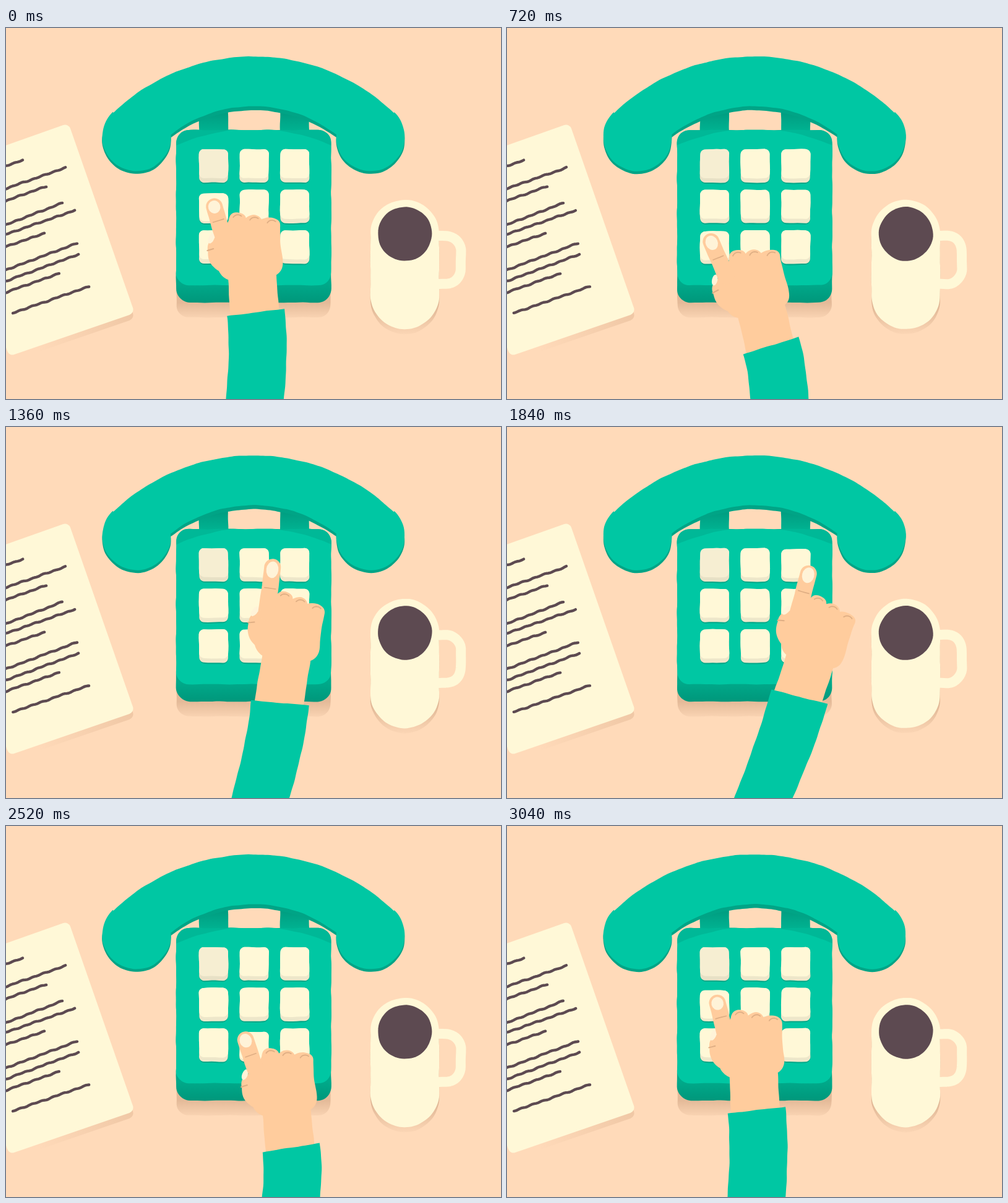
An HTML page with a canvas for the animation above (3.08 s loop, 800 by 600 pixels).

```html
<!DOCTYPE html>
<html lang="en">
<head>
<meta charset="utf-8">
<title>Dialling</title>
<style>
html, body { margin: 0; width: 100%; height: 100%; overflow: hidden; background: #ffdab9; }
canvas { display: block; }
</style>
</head>
<body>
<canvas id="stage" width="800" height="600"></canvas>
<script>
const ctx = document.getElementById('stage').getContext('2d');
const LOOP = 3080, STEP = 40, TAU = Math.PI * 2;
const GREEN = '#00c7a3', CREAM = '#fff8d7', SKIN = '#ffcc9d', CREASE = '#dfae84', BROWN = '#5d4a51';
let phase = 0;

// A path sampled into short steps, so its edge can wobble like a hand-cut shape.
class Shape {
  constructor(amp = 0.3) { this.pts = []; this.amp = amp; }
  to(x, y) {
    const last = this.pts[this.pts.length - 1];
    if (!last) { this.pts.push([x, y]); return this; }
    const n = Math.max(1, Math.round(Math.hypot(x - last[0], y - last[1]) / 6));
    for (let i = 1; i <= n; i++) {
      this.pts.push([last[0] + (x - last[0]) * i / n, last[1] + (y - last[1]) * i / n]);
    }
    return this;
  }
  quad(cx, cy, x, y) {
    const [sx, sy] = this.pts[this.pts.length - 1];
    const n = Math.ceil((Math.hypot(cx - sx, cy - sy) + Math.hypot(x - cx, y - cy)) / 5) + 2;
    for (let i = 1; i <= n; i++) {
      const u = i / n, v = 1 - u;
      this.pts.push([v * v * sx + 2 * u * v * cx + u * u * x, v * v * sy + 2 * u * v * cy + u * u * y]);
    }
    return this;
  }
  arc(cx, cy, r, a, b) {
    const n = Math.ceil(Math.abs(b - a) * r / 4) + 2;
    for (let i = 0; i <= n; i++) {
      const k = a + (b - a) * i / n;
      this.pts.push([cx + r * Math.cos(k), cy + r * Math.sin(k)]);
    }
    return this;
  }
  trace() {
    ctx.beginPath();
    for (const [x, y] of this.pts) {
      const dx = Math.sin(y * 0.1 + x * 0.03 + phase) + 0.5 * Math.sin(y * 0.23 - phase * 2);
      const dy = Math.sin(x * 0.1 - y * 0.04 - phase) + 0.5 * Math.sin(x * 0.22 + phase * 2);
      ctx.lineTo(x + dx * this.amp, y + dy * this.amp);
    }
  }
  fill(color) {
    this.trace();
    ctx.closePath();
    ctx.fillStyle = color;
    ctx.fill();
  }
  stroke(color, width) {
    this.trace();
    ctx.strokeStyle = color;
    ctx.lineWidth = width;
    ctx.stroke();
  }
}

function box(x, y, w, h, r, amp) {
  const q = TAU / 4;
  return new Shape(amp)
    .to(x + r, y).to(x + w - r, y).arc(x + w - r, y + r, r, -q, 0)
    .to(x + w, y + h - r).arc(x + w - r, y + h - r, r, 0, q)
    .to(x + r, y + h).arc(x + r, y + h - r, r, q, 2 * q)
    .to(x, y + r).arc(x + r, y + r, r, 2 * q, 3 * q);
}

function fade(y0, y1, from, to) {
  const g = ctx.createLinearGradient(0, y0, 0, y1);
  g.addColorStop(0, from);
  g.addColorStop(1, to);
  return g;
}

function ellipse(x, y, rx, ry, angle, color) {
  ctx.beginPath();
  ctx.ellipse(x, y, rx, ry, angle, 0, TAU);
  ctx.fillStyle = color;
  ctx.fill();
}

// ---------- desk ----------

function sheet(dy, color) {
  ctx.beginPath();
  ctx.moveTo(-40, 204 + dy);
  ctx.arcTo(101, 154 + dy, 208, 461 + dy, 9);
  ctx.arcTo(208, 461 + dy, 5, 531 + dy, 9);
  ctx.arcTo(5, 531 + dy, -102, 226 + dy, 9);
  ctx.lineTo(-40, 400 + dy);
  ctx.closePath();
  ctx.fillStyle = color;
  ctx.fill();
}

// Start and end of each handwritten line.
const LINES = [
  [-10, 226, 27, 214], [-10, 263, 96, 226], [-10, 283, 65, 256], [-10, 322, 91, 283],
  [-10, 337, 111, 295], [-10, 357, 62, 332], [-10, 395, 115, 348], [-10, 413, 117, 366],
  [-10, 431, 86, 397], [11, 461, 134, 418]
];

function paper() {
  const g = ctx.createLinearGradient(205, 465, 50, 520);
  g.addColorStop(0, 'rgba(165,110,70,.17)');
  g.addColorStop(1, 'rgba(165,110,70,0)');
  sheet(9, g);
  sheet(0, CREAM);
  LINES.forEach(([x0, y0, x1, y1], row) => {
    const line = new Shape(0.15), n = Math.ceil((x1 - x0) / 3);
    for (let i = 0; i <= n; i++) {
      const x = x0 + (x1 - x0) * i / n;
      const wave = Math.sin(x * 0.36 + row * 1.7) + 0.5 * Math.sin(x * 0.17 + row);
      line.pts.push([x, y0 + (y1 - y0) * i / n + wave * 0.6]);
    }
    line.stroke(BROWN, 4.4);
  });
}

function mug() {
  box(589, 286, 111, 209, 55).fill(fade(438, 496, 'rgba(150,100,65,.36)', 'rgba(150,100,65,.03)'));
  new Shape().to(690, 336).to(711, 336).arc(711, 360, 24, -TAU / 4, 0)
    .to(735, 390).arc(711, 390, 24, 0, TAU / 4).to(690, 414).stroke(CREAM, 16);
  box(589, 278, 111, 209, 55).fill(CREAM);
  new Shape().arc(644.7, 333, 43.7, 0, TAU).fill(BROWN);
}

// ---------- telephone ----------

function handset(dy, top) {
  const y = 176 + dy, end = y - 4, sag = end - top;
  const r = (133 * 133 + sag * sag) / (2 * sag), cy = top + r;
  const a = Math.asin(133 / r), q = TAU / 4, tilt = Math.atan2(197, 189);
  return new Shape()
    .arc(400, 373 + dy, 327, Math.PI + tilt, TAU - tilt)
    .arc(589, y, 55.5, -tilt, Math.PI + 0.07)
    .arc(400, cy, r, -q + a, -q - a)
    .arc(211, y, 55.5, -0.07, Math.PI + tilt);
}

const PRESSES = [[3, 20], [6, 815], [2, 1745], [7, 2545]];

function depth(key, t) {
  let d = 0;
  for (const [k, at] of PRESSES) {
    if (k !== key) continue;
    const gap = Math.abs(t - at), near = Math.min(gap, LOOP - gap) / 110;
    d = Math.max(d, 6 * (1 - near * near));
  }
  return d;
}

function phone(t) {
  box(275.5, 400, 249, 68, 20).fill(fade(444, 469, 'rgba(150,95,60,.26)', 'rgba(150,95,60,.05)'));
  for (const x of [312, 443]) {
    box(x, 125, 47, 48, 1).fill(fade(134, 166, '#009b7f', '#00b291'));
  }
  box(275, 165, 250.5, 279, 22).fill(fade(414, 444, '#00a98a', '#00977b'));
  const face = box(275, 165, 250.5, 251, 20);
  face.fill(GREEN);
  ctx.save();
  face.trace();
  ctx.clip();
  new Shape().to(270, 160).to(270, 192).quad(400, 134, 531, 192).to(531, 160)
    .fill('rgba(0,125,102,.2)');
  ctx.restore();

  for (let i = 0; i < 9; i++) {
    const x = 312 + (i % 3) * 65.6, y = 196 + Math.floor(i / 3) * 65.6, d = depth(i, t);
    box(x, y + 8 + d, 47, 48 - d, 9).fill('rgba(0,125,100,.45)');
    box(x, y + d, 47, 54 - d, 8).fill(i ? '#eee7ca' : '#e8e1c6');
    box(x, y + d, 47, 47 - d * 0.4, 8).fill(i ? CREAM : '#f6eed2');
  }
  handset(4.5, 133).fill('#00a486');
  handset(0, 126.5).fill(GREEN);
}

// ---------- hand ----------

// time, knuckle x y, turn, fingertip x y, wrist reach, sleeve x at the bottom edge
const POSES = [
  [0, 374, 298, 0, 336.5, 289, 0, 402],
  [360, 341, 333, -10.5, 303, 307, 0, 413.5],
  [720, 370, 359, -9.8, 330, 345.5, 0, 440.5],
  [1360, 452, 266, 12.3, 431, 227, 16, 410.5],
  [1840, 506, 273, 21.8, 487.5, 237, 2, 413.5],
  [2520, 427, 359, -1.5, 387, 346, 0, 460.5],
  [3040, 376, 297, 0.8, 340, 286.5, 0, 403]
];

function poseAt(t) {
  const n = POSES.length;
  const time = i => POSES[(i + n) % n][0] + Math.floor(i / n) * LOOP;
  const val = (i, c) => POSES[(i + n) % n][c];
  const slope = (i, c) => {
    const h0 = time(i) - time(i - 1), h1 = time(i + 1) - time(i);
    const d0 = (val(i, c) - val(i - 1, c)) / h0, d1 = (val(i + 1, c) - val(i, c)) / h1;
    return (d0 * h1 + d1 * h0) / (h0 + h1);
  };
  let i = n - 1;
  while (time(i) > t) i--;
  const h = time(i + 1) - time(i), u = (t - time(i)) / h, v = 1 - u;
  return [1, 2, 3, 4, 5, 6, 7].map(c =>
    v * v * (1 + 2 * u) * val(i, c) + u * v * v * h * slope(i, c) +
    u * u * (3 - 2 * u) * val(i + 1, c) - u * u * v * h * slope(i + 1, c));
}

function finger(x, y) {
  const bx = 351, by = 337;
  const len = Math.hypot(bx - x, by - y), ux = (bx - x) / len, uy = (by - y) / len;
  new Shape(0.25).to(x, y).to(bx, by).stroke(SKIN, 27);
  const off = (len - 47) * 0.15;
  ellipse(x + ux * off, y + uy * off, 9.8, 4 + len * 0.13, Math.atan2(uy, ux) - TAU / 4, '#fff3d8');
  const cx = x + ux * len * 0.47, cy = y + uy * len * 0.47;
  new Shape(0.2).to(cx - uy * 9, cy + ux * 9).to(cx + uy * 9, cy - ux * 9).stroke(CREASE, 1.7);
}

function hand(t) {
  const [kx, ky, turn, tx, ty, reach, foot] = poseAt(t);
  const a = turn * Math.PI / 180, c = Math.cos(a), s = Math.sin(a);
  const toStage = (x, y) => [kx + (x - 374) * c - (y - 298) * s, ky + (x - 374) * s + (y - 298) * c];

  ctx.save();
  ctx.translate(kx, ky);
  ctx.rotate(a);
  ctx.translate(-374, -298);
  new Shape().to(352, 330).to(360, 312)
    .quad(361, 298, 374, 298).quad(386, 299, 388, 307)
    .quad(394, 302, 401, 302).quad(410, 303, 413, 310)
    .quad(421, 306, 430, 307).quad(443, 309, 443, 319)
    .quad(442, 342, 446, 366).quad(451, 391, 437, 399)
    .to(442, 470 + reach).to(363, 475 + reach)
    .to(359, 407).quad(349, 403, 344, 393)
    .quad(326, 383, 326, 362).quad(323, 347, 336, 340)
    .fill(SKIN);
  ellipse(332, 340, 4.5, 9, 0.4, '#fff3d8');
  new Shape(0.2).to(325, 360).to(335, 357).stroke(CREASE, 2);
  for (const [x, y] of [[375, 311], [402, 315], [430, 320]]) {
    new Shape(0.2).arc(x, y, 9, -2.6, -0.9).stroke(CREASE, 1.8);
  }
  const dx = tx - kx, dy = ty - ky;
  finger(374 + dx * c + dy * s, 298 - dx * s + dy * c);
  ctx.restore();

  const [lx, ly] = toStage(357, 466 + reach), [rx, ry] = toStage(450, 454 + reach);
  const width = Math.hypot(rx - lx, ry - ly), px = -(ry - ly) / width, py = (rx - lx) / width;
  const bend = 0.4, la = (600 - ly) * bend, ra = (600 - ry) * bend;
  new Shape().to(lx, ly).to(rx, ry)
    .quad(rx + px * ra, ry + py * ra, foot + 47, 602)
    .to(foot - 47, 602)
    .quad(lx + px * la, ly + py * la, lx, ly)
    .fill(GREEN);
}

function draw(now) {
  const t = Math.floor((now % LOOP) / STEP) * STEP;
  phase = t / LOOP * TAU * 11;
  ctx.lineCap = ctx.lineJoin = 'round';
  ctx.fillStyle = '#ffdab9';
  ctx.fillRect(0, 0, 800, 600);
  paper();
  mug();
  phone(t);
  hand(t);
  requestAnimationFrame(() => draw(performance.now()));
}
draw(performance.now());
</script>
</body>
</html>
```
